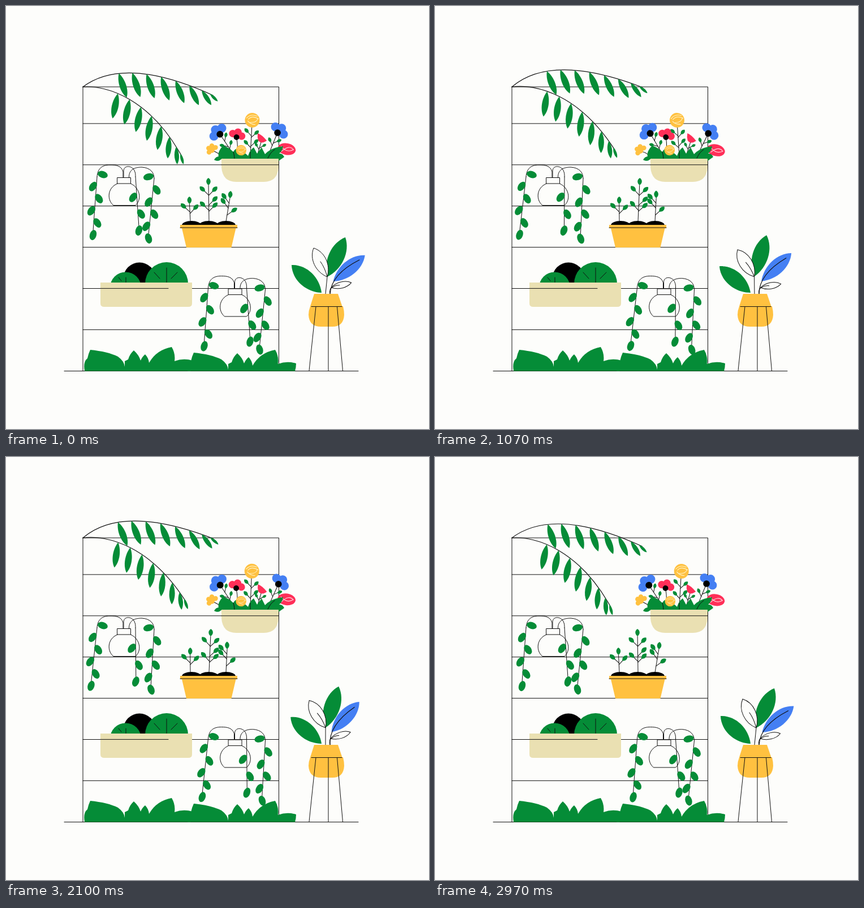
An HTML page that plays this animation: 748x748 px, repeating every 3010 ms.

```html
<!DOCTYPE html>
<html lang="en">
<head>
<meta charset="utf-8">
<title>Vertical garden</title>
<style>
html, body { margin: 0; height: 100%; overflow: hidden; background: #fdfdfb; }
svg { display: block; width: 100vw; height: 100vh; }
</style>
</head>
<body>
<svg id="stage" viewBox="0 0 748 748"></svg>
<script>
const LOOP = 3010, GROUND = 645.5;
const GREEN = '#058c37', YELLOW = '#ffc140', BEIGE = '#eae0b2', BLUE = '#447ff3',
  RED = '#ff2f58', BLACK = '#000', INK = '#111', PAPER = '#fdfdfb';

const repeat = (n, draw) => Array.from({ length: n }, (_, i) => draw(i)).join('');
const mix = (a, b, f) => a + (b - a) * f;
const polar = (x, y, r, deg) =>
  [x + r * Math.cos(deg * Math.PI / 180), y + r * Math.sin(deg * Math.PI / 180)];

const fill = (d, c = GREEN, stroke = 'none') => `<path d="${d}" fill="${c}" stroke="${stroke}"/>`;
const line = (d, c = INK, w = 1) =>
  `<path d="${d}" fill="none" stroke="${c}" stroke-width="${w}" stroke-linecap="round"/>`;
const disc = (x, y, r, c) => `<circle cx="${x}" cy="${y}" r="${r}" fill="${c}"/>`;
const oval = (x, y, rx, ry, deg = 0, c = GREEN) =>
  `<ellipse cx="${x}" cy="${y}" rx="${rx}" ry="${ry}" fill="${c}" transform="rotate(${deg} ${x} ${y})"/>`;

// Pointed leaf between two tips; w is its width relative to its length.
function leaf(x1, y1, x2, y2, w, c, stroke) {
  const dx = x2 - x1, dy = y2 - y1;
  const at = (f, s) => `${x1 + dx * f - dy * w * s} ${y1 + dy * f + dx * w * s}`;
  return fill(`M${x1} ${y1}C${at(.3, .67)} ${at(.75, .67)} ${x2} ${y2}` +
    `C${at(.75, -.67)} ${at(.3, -.67)} ${x1} ${y1}Z`, c, stroke);
}

// Group that swings by deg around (x, y), furthest at time peak; hold > 1 lingers there.
const sway = (x, y, deg, peak, hold, body) =>
  `<g data-sway="${[x, y, deg, peak, hold]}">${body}</g>`;

// Straight stem with twigs at fractions of its length; the sign picks the side.
function sprig(x1, y1, x2, y2, spots, reach = 11) {
  const len = Math.hypot(x2 - x1, y2 - y1), ux = (x2 - x1) / len, uy = (y2 - y1) / len;
  const at = d => [x1 + ux * d, y1 + uy * d];
  return line(`M${x1} ${y1}L${x2} ${y2}`) + spots.map(spot => {
    const d = Math.abs(spot) * len, side = Math.sign(spot) * reach;
    const [rx, ry] = at(d - reach), [px, py] = at(d);
    const ex = px - uy * side, ey = py + ux * side;
    const twig = f => [mix(rx, ex, f), mix(ry, ey, f)];
    return line(`M${rx} ${ry}L${ex} ${ey}`) + leaf(...twig(.58), ...twig(1.4), .58);
  }).join('');
}

function fence() {
  return line('M136 143H482.5V645M136 143V645' + repeat(6, i => `M136 ${207.9 + 72.9 * i}H482.5`)) +
    line(`M103 ${GROUND}H623`);
}

// Arching stem along a cubic; leaves crowd and shrink towards the tip.
function frond(p, tilt, turn) {
  const n = 7;
  const point = (axis, t) => {
    const [a, b, c, d] = p.map(q => q[axis]), u = 1 - t;
    return u * u * u * a + 3 * u * u * t * b + 3 * u * t * t * c + t * t * t * d;
  };
  return sway(...p[0], -4.1, 1560, 1.4,
    line(`M${p[0]}C${p.slice(1).join(' ')}`, INK, 1.2) + repeat(n + 1, i => {
      const t = .985 - .6 * (1 - i / n) ** 1.35;
      const x = point(0, t), y = point(1, t);
      const size = 45 - 26 * (i / n) ** 4;
      return leaf(x, y, ...polar(x, y, size, tilt - turn * (i / n) ** 4), .26);
    }));
}

// Hanging stem with ovals on alternating sides and one at the end.
function vine(x1, y1, x2, y2, n, side, deg, leafTop = y1) {
  return sway(x1, y1, deg, 1460, 1.4, line(`M${x1} ${y1}L${x2} ${y2}`) + repeat(n, i => {
    const f = (i + .8) / (n - .2), last = i === n - 1;
    const s = i % 2 ? -side : side;
    return oval(mix(x1, x2, f) + (last ? 0 : s * 6), mix(leafTop, y2 + 7, f), 9.2, 5.9, s * (last ? 73 : 56));
  }));
}

function vase() {
  return line('M197 303.5H220.5V314H197ZM197 314C178 322 179 344 190 352.5H229C240 343 238 322 220.5 314') +
    line('M207 303V293C204 282 194 281 184 281C170 281 162 287 161 302') +
    line('M208 303V291C209 281 223 282 227 291C229 295 229 298 229 302') +
    line('M217.5 303C217 289 228 285 240 285C255 286 262 294 262 305') +
    oval(171, 298, 9.2, 6, 18) + oval(252, 302, 9.2, 6, -15) +
    vine(161, 302, 154, 398, 5, -1, 2.7) +
    vine(229, 302, 235, 390, 3, -1, 4.6, 315) +
    vine(262, 305, 252, 404, 5, 1, -3.3, 308);
}

function seedlings() {
  const seedling = (x, tipX, tipY, deg, spots) => sway(x, 381, deg, 1600, 1.4,
    sprig(x, 381, tipX, tipY, spots) + leaf(tipX, tipY, tipX + (tipX - x) / 5, tipY - 13, .58));
  return seedling(326, 324.5, 350, 2.5, [-.9, .8]) +
    seedling(359, 358, 317, 4, [-.9, .89, .62, -.48, .45]) +
    seedling(389, 396, 340, -8, [-1.05, -.84, .54]) +
    repeat(3, i => oval(328 + 30.5 * i, 388, 17, 8, 0, BLACK)) +
    fill('M308 387H409V393H406.5L398.5 427H319L311 393H308Z', YELLOW) + line('M308 392H409');
}

function cabbages() {
  return disc(236, 482, 28.5, BLACK) + disc(211.5, 498, 27.5, GREEN) + disc(284, 491, 38, GREEN) +
    line('M284 489V463M272 482L262 471M292 482L303 471M212 489V480M204 486L199 480') +
    fill('M167 489H329V526Q329 532 322 532H174Q167 532 167 526Z', BEIGE) + line('M167 499.4H287');
}

function flowerBox() {
  // Three petals fanned out from the eye, starting at angle from.
  const bloom = (x, y, r, from, c) =>
    repeat(3, i => disc(...polar(x, y, r * 1.4, from + 62 * i), r, c)) +
    disc(...polar(x, y, r * .7, from + 62), r, c) + disc(x, y, r * .75, BLACK);
  const rose = (x, y, r) => disc(x, y, r, YELLOW) +
    `<g transform="translate(${x} ${y}) scale(${r / 13})">` +
    line('M-10 -4Q-2 -12 9 -7M-7 -2Q0 -9 11 -2M-4 4Q8 5 10 -3M-8 1Q-4 7 5 8', '#fff3c8', 1.1) + '</g>';
  return sway(404, 265, 3.8, 1130, 1,
      sprig(404, 265, 378, 227, [.5, -.6, .85], 8) + bloom(378, 227, 8, 162, BLUE)) +
    sway(432, 265, -8.2, 1100, 1,
      sprig(432, 265, 436, 213, [-.85, .8, .5, -.45], 9) + rose(437, 202, 13)) +
    sway(462, 268, 4.6, 1350, 1,
      sprig(462, 268, 480, 224, [-.65, .75], 8) + bloom(480, 224, 7.8, 250, BLUE)) +
    sway(408, 262, 2.6, 800, 1,
      line('M407 232Q410 246 409 262') + bloom(407, 232, 6.6, 223, RED)) +
    sway(446, 262, 2, 1200, 1,
      sprig(445, 262, 452, 237, [-.6, .7], 7) +
      fill('M445 225Q453 228 461 238Q452 245 446 238Q444 232 445 225Z', RED)) +
    sway(463, 262, 6.5, 850, 1,
      line('M463 262Q472 252 484 252') + oval(496, 251.5, 16, 10.3, 8, RED) +
      line('M486 247Q496 259 508 252Q500 243 487 256', '#ffd9df', 1.1)) +
    sway(381, 267, -5, 1050, 1,
      line('M366 256Q376 259 381 267') + disc(364, 254, 5.5, YELLOW) +
      repeat(4, i => disc(...polar(365, 254, 7, 145 + 60 * i), 4.3, YELLOW))) +
    leaf(368, 272, 382, 268, .5) +
    fill('M377 271Q372 258 384 247Q394 250 402 258Q406 250 411 254Q424 260 428 265Q431 255 438 250' +
      'L444 261L452 250L458 262Q469 250 490 248Q489 256 483 261Q489 260 492 267L482 274Z') +
    line('M404 270Q404 264 402 258M432 269V258M463 269Q468 258 475 254') +
    sway(416, 275, -3.5, 1100, 1, rose(416, 255, 9.3)) +
    fill('M381 270H482V285Q480 311 456 311H407Q383 311 381 285Z', BEIGE) + line('M381 280.8H482');
}

function bushes() {
  const bush = fill('M140 650Q135 630 144 623Q146 614 149 608Q180 611 198 620Q209 628 210 638V628' +
    'L216 625Q219 615 226 609Q235 617 238 627Q241 620 246 616Q252 622 253 631' +
    'Q266 608 293 603Q300 615 298 628Q314 622 330 627Q330 640 324 650Z');
  return `<clipPath id="soil"><path d="M0 0H748V${GROUND}H0Z"/></clipPath>` +
    `<g clip-path="url(#soil)">${bush}<g transform="translate(183 5)">${bush}</g></g>`;
}

function pottedPlant() {
  return sway(558, 507, -2.7, 1500, 1.4, leaf(558, 507, 505, 458, .38)) +
    sway(565, 509, -8.5, 1500, 1.4, leaf(568, 479, 600, 409, .36)) +
    sway(565, 509, -7.2, 1500, 1.4,
      leaf(568, 479, 544, 428, .4, PAPER, INK) + line('M565 509L568 479Q564 463 556 452')) +
    sway(573, 509, -9.8, 1830, 1,
      leaf(579, 487, 636, 442, .35, BLUE) + line('M573 509Q576 474 626 450', INK, 1.2)) +
    sway(573, 509, -8.6, 2250, 1,
      leaf(576, 498, 612, 492, .3, PAPER, INK) + line('M573 509Q572 500 577 498Q584 494 591 495')) +
    fill('M545 509H587L594.5 531H596Q598 539 598 546Q597 567 577 567H557Q536 567 535 546Q535 539 538 531Z', YELLOW) +
    line('M540 531.5H594M548 531.5L536 645M570 531.5V645M585.5 531.5L595.5 645');
}

const stage = document.getElementById('stage');
stage.innerHTML = fence() +
  frond([[136, 143], [180, 110], [250, 105], [366, 158]], 72, 28) +
  frond([[136, 143], [180, 140], [255, 165], [311, 266]], 102, 28) +
  vase() + seedlings() + cabbages() +
  `<g transform="translate(196.5 196.5)">${vase()}</g>` +
  bushes() + flowerBox() + pottedPlant();

const parts = [...stage.querySelectorAll('[data-sway]')].map(el =>
  [el, ...el.dataset.sway.split(',').map(Number)]);

const start = performance.now();
function tick() {
  const t = (performance.now() - start) % LOOP;
  for (const [el, x, y, deg, peak, hold] of parts) {
    const s = (1 + Math.cos((t - peak) / LOOP * 2 * Math.PI)) / 2;
    const angle = deg * (1 - (1 - s) ** hold);
    el.setAttribute('transform', `rotate(${angle.toFixed(3)} ${x} ${y})`);
  }
  requestAnimationFrame(tick);
}
tick();
</script>
</body>
</html>
```
